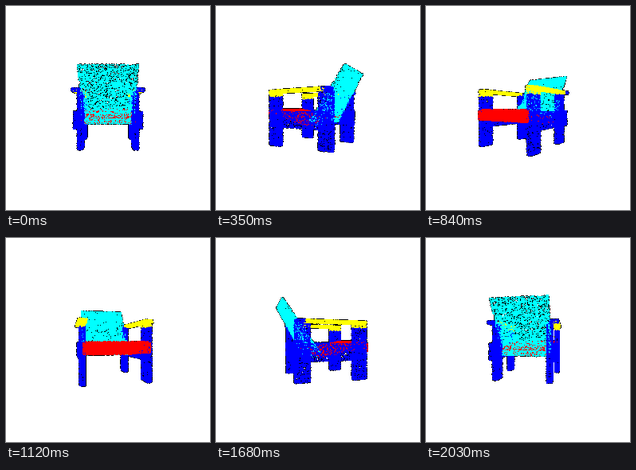
Write a matplotlib script that moves like this. It is 256 px wide and 256 px high and loops after 2100 ms.

```python
import numpy as np
import matplotlib.pyplot as plt
from matplotlib.animation import FuncAnimation

SIZE, FRAMES, STEP_MS = 256, 30, 70
FOCAL = SIZE / 2 / np.tan(np.pi / 6)  # 60 degree field of view
CORE, RIM, REACH = 0.8, 1.3, 2  # disc radii and search range in pixels
BLUE, RED, YELLOW, CYAN = (0, 0, 255), (255, 0, 0), (255, 255, 0), (0, 255, 255)
rng = np.random.default_rng(7)


def box(right, up, rear, density=0.6):
    """Random points on the faces of a box given by its three ranges."""
    lo, hi = np.array([right, up, rear], float).T
    faces = []
    for axis in range(3):
        count = round(np.prod(np.delete(hi - lo, axis)) * density)
        for level in (lo[axis], hi[axis]):
            p = rng.uniform(lo, hi, (count, 3))
            p[:, axis] = level
            faces.append(p)
    return np.concatenate(faces)


def paint(p, color, mask=None, accent=None):
    c = np.tile(np.array(color, np.uint8), (len(p), 1))
    if mask is not None:
        c[mask] = accent
    return p, c


def leg(rear):
    """Upright plank; the legs stand closer together towards the rear."""
    right = 31.75 - 0.072 * rear
    return box((right - 2.5, right + 2.5), (-44.3, 17), (rear - 8, rear + 8))


def side_frame(side):
    front = leg(-38)
    arm = box((30, 38.7), (18, 21), (-45, 35), 0.8)
    parts = [
        paint(front, BLUE, front[:, 1] > 13.5, YELLOW),
        paint(leg(27), BLUE),
        paint(box((34, 36.5), (-22, -4), (-45, 35), 0.4), BLUE),
        paint(arm, YELLOW, arm[:, 2] > 26, BLUE),
    ]
    for p, _ in parts:
        p[:, 0] *= side
    return parts


def build():
    # Wedge: the front and rear planes of the back meet near the top.
    back = box((-30, 30), (-18.7, 42.7), (0, 1))
    _, up, mix = back.T
    back[:, 2] = (1 - mix) * (16.5 + 0.71 * up) + mix * (25 + 0.54 * up)

    seat = box((-33, 33), (-8, -1.5), (-46, 6))
    seat[:, 1] -= 0.21 * (seat[:, 2] + 46)

    front_board = box((-34.5, 34.5), (-13.5, -3), (-49, -46), 0.8)
    rear_bar = box((-28.5, 28.5), (-11.3, -8.3), (16, 19), 0.8)
    parts = side_frame(-1) + side_frame(1) + [paint(back, CYAN)]
    parts += [paint(p, RED) for p in (seat, front_board, rear_bar)]
    return [np.concatenate(a) for a in zip(*parts)]


points, colors = build()
span = np.arange(-REACH, REACH + 1)
offsets = np.stack(np.meshgrid(span, span), -1).reshape(-1, 2)


def render(frame):
    t = 2 * np.pi * frame / FRAMES
    right, up, rear = points.T
    x = right * np.cos(t) + rear * np.sin(t)
    near = rear * np.cos(t) - right * np.sin(t)
    scale = FOCAL / (FOCAL - near)
    order = np.argsort(near)
    pos = SIZE / 2 + (np.stack([x, -up], 1) * scale[:, None])[order]

    # Each point is a small disc: solid core, black rim, nearest core on top.
    cell = np.floor(pos).astype(int)[:, None] + offsets
    dist = np.linalg.norm(cell + 0.5 - pos[:, None], axis=2)
    img = np.full((SIZE, SIZE, 3), 255, np.uint8)
    col, row = cell[dist < RIM].T
    img[row, col] = 0

    solid = dist < CORE
    col, row = cell[solid].T
    top = np.full((SIZE, SIZE), -1)
    np.maximum.at(top, (row, col), np.nonzero(solid)[0])
    hit = top >= 0
    img[hit] = colors[order][top[hit]]
    return img


fig = plt.figure(figsize=(SIZE / 100, SIZE / 100), dpi=100, facecolor="white")
ax = fig.add_axes([0, 0, 1, 1])
ax.axis("off")
view = ax.imshow(render(0), interpolation="nearest", aspect="auto")


def update(frame):
    view.set_data(render(frame))
    return (view,)


anim = FuncAnimation(fig, update, frames=FRAMES, interval=STEP_MS,
                     repeat=True, repeat_delay=0, blit=False)
plt.show()
```
